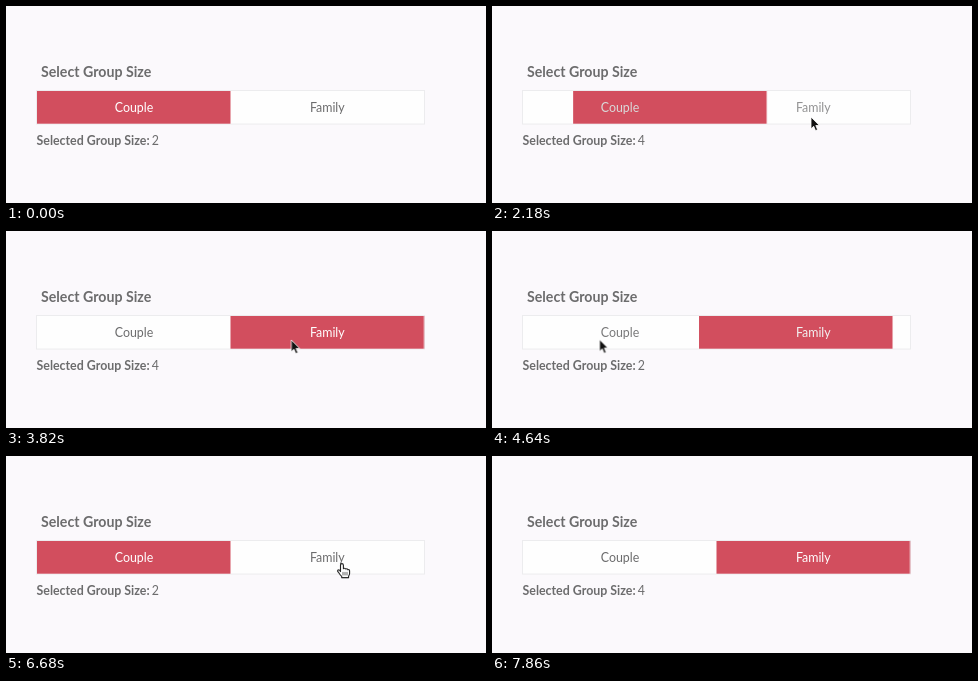
These frames come from a looping animation (480 by 197 pixels, 9550 ms). An HTML page:

```html
<!DOCTYPE html>
<html lang="en">
<head>
<meta charset="utf-8">
<title>Group size toggle</title>
<style>
html, body { margin: 0; width: 100%; height: 100%; overflow: hidden; background: #fbf9fc; }
svg { display: block; width: 100vw; height: 100vh; }
text { font: 12.4px Lato, sans-serif; fill: #6c6c6d; }
.bold { font-weight: 700; }
.title { font-size: 14.2px; }
.label { text-anchor: middle; }
.thumb, .label, .value, .cursor, .arrow, .hand { animation: 9550ms linear infinite; }
.thumb { fill: #d24e5e; animation-name: slide; }
.couple { animation-name: couple; }
.family { animation-name: family; }
.two { animation-name: two; }
.four { animation-name: four; }
.cursor { animation-name: move; }
.arrow { animation-name: arrow; }
.hand { animation-name: hand; }

@keyframes slide {
  0%, 21.361% { transform: translateX(0); animation-timing-function: ease-in-out; }
  25.55%, 47.717% { transform: translateX(193.5px); animation-timing-function: ease-in-out; }
  51.906%, 75.812% { transform: translateX(0); animation-timing-function: ease-in-out; }
  80%, 100% { transform: translateX(193.5px); }
}
@keyframes couple {
  0%, 21.361% { fill: #fff; animation-timing-function: ease-in-out; }
  25.55%, 47.717% { fill: #6c6c6d; animation-timing-function: ease-in-out; }
  51.906%, 75.812% { fill: #fff; animation-timing-function: ease-in-out; }
  80%, 100% { fill: #6c6c6d; }
}
@keyframes family {
  0%, 21.361% { fill: #6c6c6d; animation-timing-function: ease-in-out; }
  25.55%, 47.717% { fill: #fff; animation-timing-function: ease-in-out; }
  51.906%, 75.812% { fill: #6c6c6d; animation-timing-function: ease-in-out; }
  80%, 100% { fill: #fff; }
}
@keyframes two {
  0%, 47.717% { opacity: 1; animation-timing-function: step-end; }
  21.361% { opacity: 0; animation-timing-function: step-end; }
  75.812%, 100% { opacity: 0; }
}
@keyframes four {
  0%, 47.717% { opacity: 0; animation-timing-function: step-end; }
  21.361% { opacity: 1; animation-timing-function: step-end; }
  75.812%, 100% { opacity: 1; }
}
@keyframes move {
  0%, .52% { transform: translate(312px, 200px); animation-timing-function: ease-in-out; }
  10.471%, 11.414% { transform: translate(119px, 110px); animation-timing-function: ease-in-out; }
  14.136% { transform: translate(325px, 112px); animation-timing-function: ease-in-out; }
  15.707% { transform: translate(319px, 110px); }
  19.058%, 23.56% { transform: translate(319px, 111px); animation-timing-function: ease-in-out; }
  28.586% { transform: translate(147px, 106px); animation-timing-function: ease-out; }
  30.89%, 31.414% { transform: translate(121px, 106px); animation-timing-function: ease-in-out; }
  36.649%, 38.115% { transform: translate(309px, 109px); animation-timing-function: ease-in-out; }
  46.073% { transform: translate(106px, 108px); }
  48.586% { transform: translate(107.5px, 108.5px); animation-timing-function: ease-in-out; }
  52.88%, 53.403% { transform: translate(120px, 111px); animation-timing-function: ease-in-out; }
  57.382%, 69.948% { transform: translate(336px, 107px); }
  75.812% { transform: translate(332px, 109px); animation-timing-function: ease-in; }
  80.628%, 100% { transform: translate(312px, 200px); }
}
@keyframes arrow {
  0%, 21.361%, 34.03%, 47.717%, 75.812% { opacity: 1; animation-timing-function: step-end; }
  12.775%, 26.18%, 41.885%, 55.393% { opacity: 0; animation-timing-function: step-end; }
  100% { opacity: 1; }
}
@keyframes hand {
  0%, 21.361%, 34.03%, 47.717%, 75.812% { opacity: 0; animation-timing-function: step-end; }
  12.775%, 26.18%, 41.885%, 55.393% { opacity: 1; animation-timing-function: step-end; }
  100% { opacity: 0; }
}
</style>
</head>
<body>
<svg viewBox="0 0 480 197">
  <text class="bold title" x="35" y="70.5">Select Group Size</text>
  <rect x="30.5" y="84.5" width="388" height="33.5" fill="#fefefe" stroke="#ececee"/>
  <rect class="thumb" x="31" y="85" width="193.5" height="32.7"/>
  <text class="label couple" x="128" y="106">Couple</text>
  <text class="label family" x="321.3" y="106">Family</text>
  <text class="bold" x="30.5" y="139">Selected Group Size:</text>
  <text class="value two" x="145.7" y="139">2</text>
  <text class="value four" x="145.7" y="139">4</text>
  <g class="cursor">
    <path class="arrow" d="M0 0V11.8L2.7 9.3 4.5 13.6 6.6 12.7 4.8 8.5H8.4Z" fill="#111" stroke="#fff" stroke-width=".8"/>
    <g class="hand" stroke="#222" stroke-linecap="round" stroke-linejoin="round">
      <path d="M-1.5 8.5V2Q-1.5.6-.1.6T1.4 2V5.6Q2.8 4.7 3.8 6 5.1 5.3 5.9 6.6 7.6 6.2 7.6 8V10.5Q7.4 12 6.6 13V14.6H-.3V13.3Q-2 11.8-3 10L-4.3 8.3Q-4.6 6.8-3.2 6.8-2.2 7.2-1.5 8.5Z" fill="#fff" stroke-width="1.1"/>
      <path d="M1 9.3V12M3 9.3V12M5 9.3V12" stroke-width=".7"/>
    </g>
  </g>
</svg>
</body>
</html>
```
